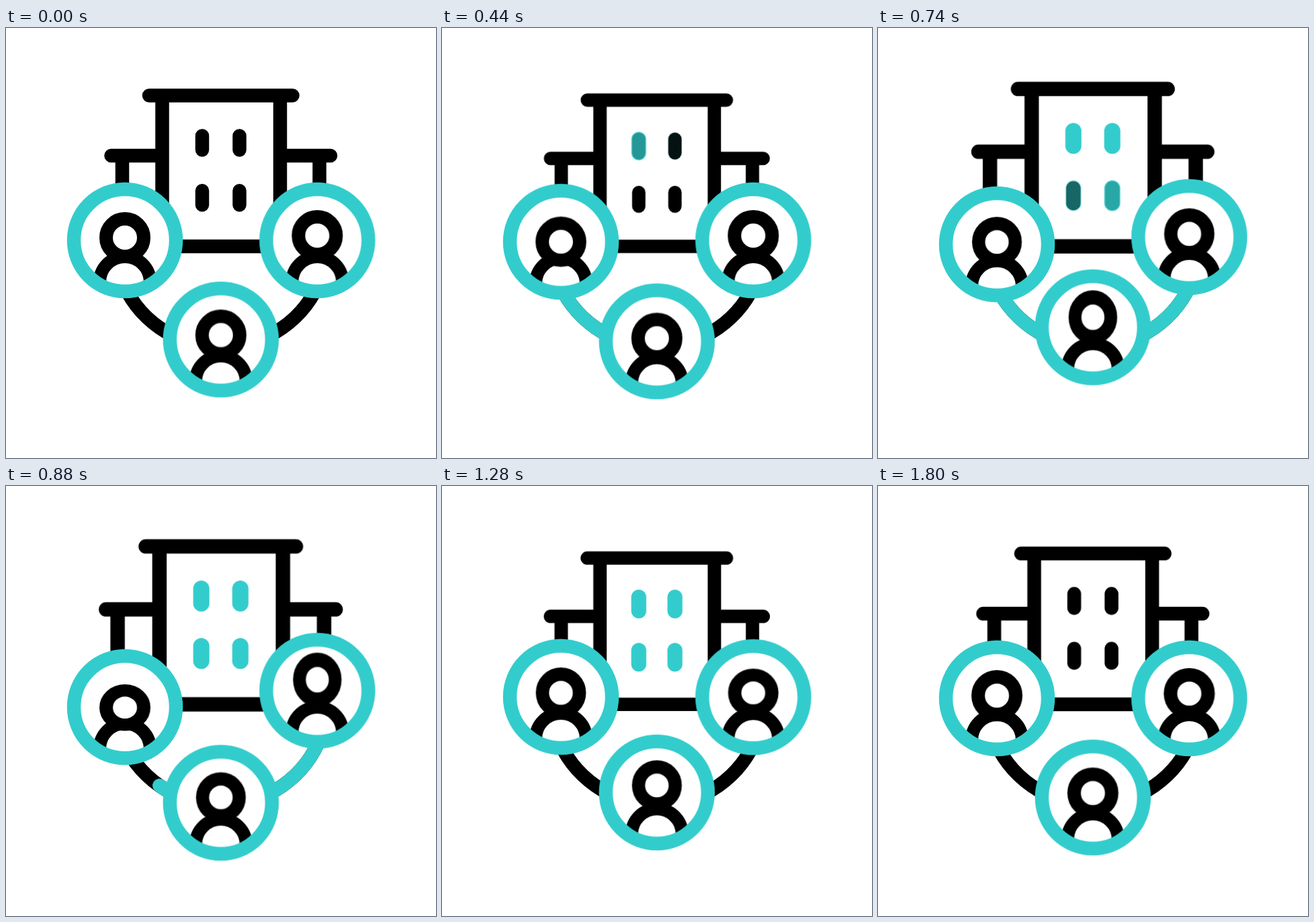
Recreate the animation shown at these times as an HTML page. Size 640 px wide and 640 px high, loop 2.18 s.

```html
<!DOCTYPE html>
<html lang="en">
<head>
<meta charset="utf-8">
<title>Company network</title>
<style>
  html, body { margin: 0; width: 100%; height: 100%; overflow: hidden; background: #fff; }
  svg { display: block; width: 100%; height: 100%; }

  .line { fill: none; stroke: #000; stroke-width: 20.5; stroke-linecap: round; }
  .aqua { stroke: #33cccc; }

  .building, .bob, .head, .lit, .sweep {
    animation: 2180ms cubic-bezier(.333, 0, .667, 1) infinite;
  }

  .building { transform-origin: 320px 325px; animation-name: breathe; }
  @keyframes breathe {
    0%, 7.34% { transform: scale(1); }
    15.83% { transform: scale(.96); }
    37.61% { transform: scale(1.05); }
    62.84% { transform: scale(.964); }
    75.69%, 100% { transform: scale(1); }
  }

  /* windows light up clockwise */
  .lit { stroke: #33cccc; stroke-width: 23; opacity: 0; animation-timing-function: linear; }
  .w1 { animation-name: lit1; }
  .w2 { animation-name: lit2; }
  .w3 { animation-name: lit3; }
  .w4 { animation-name: lit4; }
  @keyframes lit1 { 0%, 12.39%, 82.57%, 100% { opacity: 0; } 22.94%, 71.56% { opacity: 1; } }
  @keyframes lit2 { 0%, 19.27%, 76.83%, 100% { opacity: 0; } 30.28%, 65.83% { opacity: 1; } }
  @keyframes lit3 { 0%, 26.01%, 76.83%, 100% { opacity: 0; } 35.78%, 65.83% { opacity: 1; } }
  @keyframes lit4 { 0%, 28.44%, 79.82%, 100% { opacity: 0; } 39.45%, 68.81% { opacity: 1; } }

  .sweep { stroke-dasharray: 100 200; stroke-dashoffset: 100; animation-name: sweep; }
  @keyframes sweep {
    0%, 13.07% { stroke-dashoffset: 100; }
    25.69%, 36.24% { stroke-dashoffset: 0; }
    49.08%, 100% { stroke-dashoffset: -100; }
  }

  /* --b: badge swings, --h: head swings */
  .left { --b1: 8.5px; --b2: -16.5px; --b3: 14.5px; --b4: -6.5px;
          --h1: 5px; --h2: -4px; --h3: 5px; --h4: -3px; }
  .mid { --b1: 11px; --b2: -21px; --b3: 19px; --b4: -8px;
         --h1: 8px; --h2: -9px; --h3: 6px; --h4: -4.5px; --delay: 140ms; }
  .right { --b1: 10px; --b2: -15px; --b3: 12.2px; --b4: -5px;
           --h1: 8px; --h2: -9.5px; --h3: 6px; --h4: -4.5px; --delay: 260ms; }

  .bob { animation-name: bob; animation-delay: var(--delay, 0ms); }
  @keyframes bob {
    0%, 11.93% { transform: translateY(0px); }
    17.66% { transform: translateY(var(--b1)); }
    25.46% { transform: translateY(var(--b2)); }
    38.53% { transform: translateY(var(--b3)); }
    50% { transform: translateY(var(--b4)); }
    64.22%, 100% { transform: translateY(0px); }
  }

  .head { animation-name: nod; animation-delay: var(--delay, 0ms); }
  @keyframes nod {
    0%, 11.93% { transform: translateY(0px) scale(1, 1); }
    17.89% { transform: translateY(var(--h1)) scale(1, .975); }
    28.9% { transform: translateY(var(--h2)) scale(.95, 1.06); }
    38.99% { transform: translateY(var(--h3)) scale(1, .91); }
    54.59% { transform: translateY(var(--h4)) scale(.975, .99); }
    65.6%, 100% { transform: translateY(0px) scale(1, 1); }
  }
</style>
</head>
<body>
<svg viewBox="0 0 640 640">
  <defs>
    <clipPath id="inside"><circle r="70"/></clipPath>
    <path id="arc" d="M170.6 370.4A159 159 0 0 0 469.4 370.4" pathLength="100"/>
    <path id="pane" d="M0 -10.5V10.5"/>
    <circle id="disc" r="76" fill="#fff"/>
    <circle id="ring" r="76" fill="none" stroke="#33cccc" stroke-width="20.5"/>
    <circle id="body" cy="62" r="37.5" fill="#fff" stroke="#000" stroke-width="19"/>
    <circle id="face" r="28" fill="#fff" stroke="#000" stroke-width="20"/>
  </defs>

  <rect width="640" height="640" fill="#fff"/>

  <g class="building line">
    <path d="M213 100.5H426.5M232.5 100.5V325H408V100.5M156.5 190H232.5M408 190H483M173 190V300M466.5 190V300"/>
    <g transform="translate(292 171)"><use href="#pane"/><use href="#pane" class="lit w1"/></g>
    <g transform="translate(347.5 171)"><use href="#pane"/><use href="#pane" class="lit w2"/></g>
    <g transform="translate(347.5 252.7)"><use href="#pane"/><use href="#pane" class="lit w3"/></g>
    <g transform="translate(292 252.7)"><use href="#pane"/><use href="#pane" class="lit w4"/></g>
  </g>

  <use href="#arc" class="line"/>
  <use href="#arc" class="line aqua sweep"/>

  <g class="left" transform="translate(177 316)">
    <g class="bob">
      <use href="#disc"/>
      <g clip-path="url(#inside)">
        <use href="#body"/>
        <g transform="translate(0 -4)"><g class="head"><use href="#face"/></g></g>
      </g>
      <use href="#ring"/>
    </g>
  </g>

  <g class="right" transform="translate(463.3 316)">
    <g class="bob">
      <use href="#disc"/>
      <g clip-path="url(#inside)">
        <use href="#body"/>
        <g transform="translate(0 -7)"><g class="head"><use href="#face"/></g></g>
      </g>
      <use href="#ring"/>
    </g>
  </g>

  <g class="mid" transform="translate(319.8 463.6)">
    <g class="bob">
      <use href="#disc"/>
      <g clip-path="url(#inside)">
        <use href="#body"/>
        <g transform="translate(0 -6.6)"><g class="head"><use href="#face"/></g></g>
      </g>
      <use href="#ring"/>
    </g>
  </g>
</svg>
</body>
</html>
```
